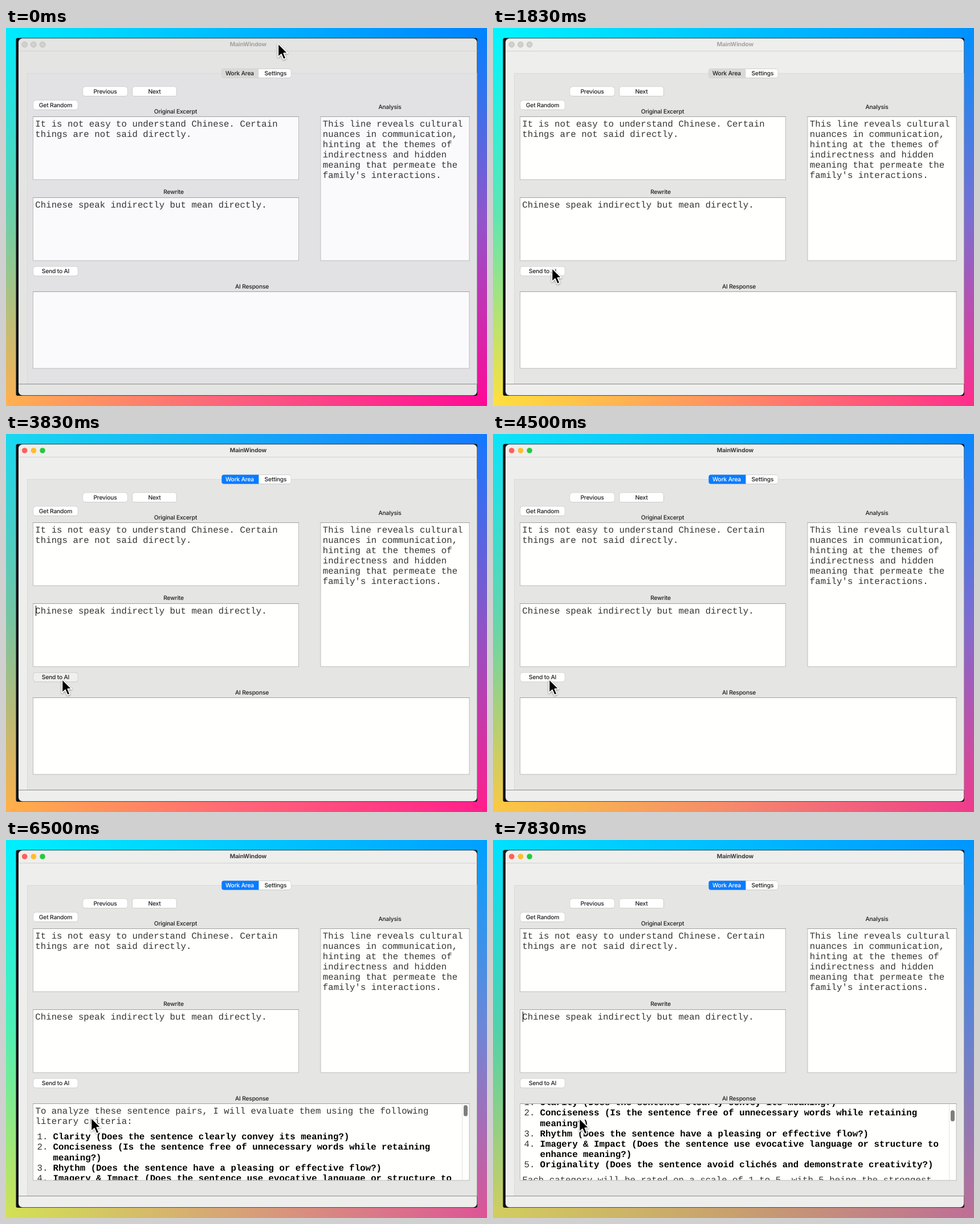
Recreate the animation shown at these times as an HTML page. Size 844 px wide and 663 px high, loop 8000 ms.

```html
<!DOCTYPE html>
<html lang="en">
<head>
<meta charset="utf-8">
<title>MainWindow</title>
<style>
  html, body { margin: 0; width: 100%; height: 100%; overflow: hidden; }
  #stage { position: relative; width: 844px; height: 663px; overflow: hidden; }
  .edge { position: absolute; }
  #top { left: 0; top: 0; width: 844px; height: 18px; }
  #bottom { left: 0; bottom: 0; width: 844px; height: 19px; }
  #left { left: 0; top: 0; width: 18px; height: 663px; }
  #right { right: 0; top: 0; width: 18px; height: 663px; }
  svg { position: absolute; left: 0; top: 0; }
  text { text-rendering: geometricPrecision; }
  .ui { font: 500 10.3px Inter, sans-serif; letter-spacing: -.2px; text-anchor: middle; fill: #1c1c1c; }
  .mono { font: 15.75px "Liberation Mono", monospace; fill: #343434; }
  .bold { font-weight: 700; fill: #000; }
  .title { font-weight: 700; letter-spacing: -.1px; fill: #3c3c3c; }
  .chrome { fill: #eeeeec; }
  .panel { fill: #e5e5e3; }
  .field { fill: #fffffd; }
  .btn { fill: #fff; stroke: #0002; stroke-width: .6; filter: drop-shadow(0 .7px .5px #0005); }
  .sel { fill: #d9d9d8; }
  .light { fill: #d0d0ce; stroke: #b4b4b2; stroke-width: .8; }
  .dim .chrome { fill: #e4e4e2; }
  .dim .panel { fill: #e2e2e4; }
  .dim .field { fill: #fafafc; }
  .idle .title { fill: #a2a2a0; }
  .active .sel { fill: #0a7cff; }
  .active .selText { fill: #fff; }
  .active .light { fill: var(--on); stroke: none; }
  .pressed #send { fill: #f0f0ef; }
  #cursor { filter: drop-shadow(0 1.5px 1.5px #0006); }
</style>
</head>
<body>
<div id="stage">
  <div class="edge" id="left"></div>
  <div class="edge" id="right"></div>
  <div class="edge" id="top"></div>
  <div class="edge" id="bottom"></div>
  <svg id="view" width="844" height="663" viewBox="0 0 844 663">
    <defs>
      <clipPath id="screen"><rect x="17.5" y="17.5" width="809.5" height="627.5" rx="3"/></clipPath>
      <clipPath id="frame"><rect x="22" y="18.3" width="804.4" height="626" rx="7"/></clipPath>
      <clipPath id="answer"><rect x="48" y="463" width="764" height="133.5"/></clipPath>
    </defs>
    <g clip-path="url(#screen)">
      <path d="M17 17H827V645H17z" fill="#101216"/>
      <g clip-path="url(#frame)">
        <rect class="chrome" x="22" y="18" width="810" height="627"/>
        <path d="M22 40.5H830" stroke="#d2d2d0"/>
        <rect class="panel" x="37.5" y="79.5" width="800" height="544.5" stroke="#dadad8"/>
        <path d="M22 624.5H830" stroke="#8e8e8e"/>
      </g>
      <g id="widgets"></g>
      <g clip-path="url(#answer)">
        <g id="reply"></g>
        <g id="bar">
          <path d="M800.5 463V597" stroke="#e2e2e0"/>
          <rect id="thumb" x="803" y="465" width="7" height="19.5" rx="3.5" fill="#7e7e7e"/>
        </g>
      </g>
      <path id="caret" d="M52.5 301V319" stroke="#000"/>
    </g>
    <path id="cursor" d="M.4 1.2V25L6 19.9L9.8 28.9L14.1 27L10.3 18.2H17.4z"
      fill="#000" stroke="#fff" stroke-width="1.7" stroke-linejoin="round"/>
  </svg>
</div>
<script>
const $ = id => document.getElementById(id);
const view = $('view'), widgets = $('widgets'), reply = $('reply');

function add(parent, tag, attrs, text) {
  const el = document.createElementNS('http://www.w3.org/2000/svg', tag);
  for (const k in attrs) el.setAttribute(k, attrs[k]);
  if (text) el.textContent = text;
  parent.append(el);
  return el;
}
const label = (x, y, text, cls = '') =>
  add(widgets, 'text', { x, y: y + 3.7, class: 'ui ' + cls }, text);
const mono = (parent, x, y, text, cls = '') =>
  add(parent, 'text', { x, y, class: 'mono ' + cls }, text);

function button(x, y, text, id = '') {
  add(widgets, 'rect', { x, y, width: 78, height: 16.5, rx: 4, class: 'btn', id });
  label(x + 39, y + 8, text);
}
function field(x, y, w, h, lines = []) {
  add(widgets, 'rect', { x: x + .5, y: y + .5, width: w, height: h, class: 'field', stroke: '#bcbcba' });
  add(widgets, 'path', { d: `M${x} ${y + .5}h${w + 1}`, stroke: '#a0a09e' });
  lines.forEach((s, i) => mono(widgets, x + 4.3, y + 17.6 + i * 18.05, s));
}

['#ff5f57', '#febc2e', '#28c840'].forEach((c, i) =>
  add(widgets, 'circle', { cx: 32.7 + i * 15.7, cy: 29, r: 4.8, class: 'light', style: '--on:' + c }));
label(425, 28.7, 'MainWindow', 'title');

add(widgets, 'rect', { x: 378.5, y: 71.5, width: 121.5, height: 16, rx: 4, class: 'btn' });
add(widgets, 'path', { d: 'M443.5 71.5H382.5a4 4 0 0 0-4 4v8a4 4 0 0 0 4 4H443.5z', class: 'sel' });
label(410, 79.5, 'Work Area', 'selText');
label(473, 79.5, 'Settings');

button(135, 103, 'Previous');
button(221.5, 103, 'Next');
button(48, 127, 'Get Random');
button(48, 418.3, 'Send to AI', 'send');
label(297.5, 145.8, 'Original Excerpt');
label(673.5, 138, 'Analysis');
label(294, 287.5, 'Rewrite');
label(431.5, 453, 'AI Response');

field(47, 155, 466, 110.5, [
  'It is not easy to understand Chinese. Certain',
  'things are not said directly.']);
field(47, 297, 466, 110.5, ['Chinese speak indirectly but mean directly.']);
field(551.5, 155, 261, 252.5, [
  'This line reveals cultural', 'nuances in communication,',
  'hinting at the themes of', 'indirectness and hidden',
  'meaning that permeate the', "family's interactions."]);
field(47, 462, 765.5, 134.5);

mono(reply, 51.5, 480, 'To analyze these sentence pairs, I will evaluate them using the following');
mono(reply, 51.5, 498, 'literary criteria:');
let row = 0, num = 0;
for (const item of [
  ['Clarity (Does the sentence clearly convey its meaning?)'],
  ['Conciseness (Is the sentence free of unnecessary words while retaining', 'meaning?)'],
  ['Rhythm (Does the sentence have a pleasing or effective flow?)'],
  ['Imagery & Impact (Does the sentence use evocative language or structure to', 'enhance meaning?)'],
  ['Originality (Does the sentence avoid clichés and demonstrate creativity?)']
]) {
  mono(reply, 54.5, 525.3 + row * 18.15, ++num + '.');
  for (const s of item) mono(reply, 82.5, 525.3 + row++ * 18.15, s, 'bold');
}
mono(reply, 51.5, 660.6, 'Each category will be rated on a scale of 1 to 5, with 5 being the strongest.');

// step: top-left, top-right, left-middle, right-middle, bottom-left, bottom-middle, bottom-right
const hues = [
  [0, '00ebff 0082ff 6ccfa8 9055cc ffb050 fa5c80 ff0a96'],
  [11, '00f5ff 0090ff 60e6b0 7a6ed2 ffe03c ff8c64 ff2d8c'],
  [23, '18d8f0 1478ff 78c4a0 8c55c8 ffb04a ff6478 ff1e8c'],
  [31, '00f0ff 0096ff 50e8b4 7480d7 f5e13c ebae5f dc5a8c'],
  [39, '00f0ff 00a0ff 4ff0b4 6e86d7 d2e155 d7a078 dc5596'],
  [45, '00ebff 00a0ff 46dcb4 648cd2 d2e15a cda578 c35f96'],
  [47, '00e1ff 0096ff 50d2aa 6482d2 d2cd5f c8a06e be6e96']
].map(([n, s]) => [n, ...s.split(' ').flatMap(h => h.match(/../g).map(v => parseInt(v, 16)))]);

const pointer = [
  [0, 477, 26], [5, 477, 26], [7, 165, 330], [8, 113, 390], [9, 103, 420], [17, 103, 420],
  [19, 98, 429], [28, 98, 429], [30, 180, 445], [31, 198, 452], [32, 200, 459],
  [35, 170, 480], [38, 149, 486], [39, 149, 486], [43, 151, 487], [47, 151, 487]
];
const scroll = [[0, 0], [44, 0], [45, 40], [46, 40], [47, 60]];

function sample(keys, n) {
  const i = Math.max(1, keys.findIndex(k => k[0] >= n));
  const a = keys[i - 1], b = keys[i], f = (n - a[0]) / (b[0] - a[0]);
  return a.slice(1).map((v, j) => v + (b[j + 1] - v) * f);
}

const FPS = 6, LOOP = 8000;
const held = { 15: 14, 16: 14, 33: 32, 36: 35, 44: 43 };

function draw(n) {
  const c = sample(hues, n);
  const [tl, tr, lm, rm, bl, bm, br] =
    [0, 3, 6, 9, 12, 15, 18].map(i => `rgb(${c.slice(i, i + 3).map(Math.round)})`);
  const paint = (id, dir, ...stops) =>
    $(id).style.background = `linear-gradient(to ${dir}, ${stops})`;
  paint('top', 'right', tl, tr);
  paint('left', 'bottom', tl, lm, bl);
  paint('right', 'bottom', tr, rm, br);
  paint('bottom', 'right', bl, bm, br);

  const active = n >= 18, answered = n >= 28;
  view.classList.toggle('dim', n < 6);
  view.classList.toggle('idle', !active);
  view.classList.toggle('active', active);
  view.classList.toggle('pressed', n >= 22 && n < 25);
  $('caret').style.display = active && (n + 2) % 6 < 3 ? '' : 'none';
  reply.style.display = $('bar').style.display = answered ? '' : 'none';

  const [y] = sample(scroll, n);
  reply.setAttribute('transform', `translate(0 ${-y})`);
  $('thumb').setAttribute('y', 465 + y * .15);
  $('cursor').setAttribute('transform', `translate(${sample(pointer, n)})`);
}

let last = -1;
function tick() {
  const step = Math.floor(((performance.now() % LOOP) + 10) * FPS / 1000) % 48;
  const n = held[step] ?? step;
  if (n !== last) draw(last = n);
  requestAnimationFrame(tick);
}
tick();
</script>
</body>
</html>
```
